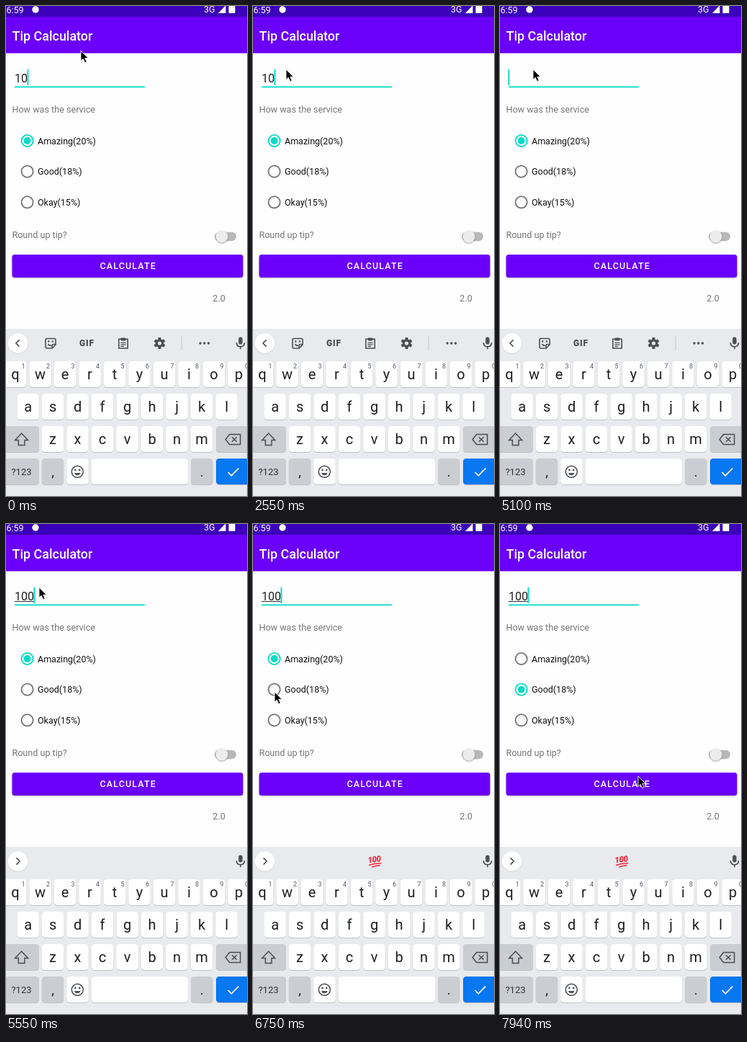
Write an HTML page with a canvas that moves like this. It is 335 px wide and 680 px high and loops after 8 s.

```html
<!DOCTYPE html>
<html lang="en">
<head>
<meta charset="utf-8">
<title>Tip Calculator</title>
<style>
html, body { margin: 0; width: 100%; height: 100%; overflow: hidden; background: #fefefe; }
canvas { display: block; width: 335px; height: 680px; }
</style>
</head>
<body>
<canvas id="stage"></canvas>
<script>
const W = 335, H = 680, LOOP = 8000;
const PURPLE = '#6a00fa', DARK = '#3b00b9', TEAL = '#00dac6', GRAY = '#757575', ICON = '#4a4d51';
const FONT = 'Roboto, sans-serif';
const canvas = document.getElementById('stage');
const ctx = canvas.getContext('2d');
const dpr = window.devicePixelRatio || 1;
canvas.width = W * dpr;
canvas.height = H * dpr;

// Held states: [start time, value...]
const POINTER = [
  [0, 104, 62], [150, 80, 84], [300, 61, 100],
  [1650, 41, 110], [1800, 40, 113], [1950, 43, 98], [2100, 46, 88],
  [5850, 64, 140], [6000, 84, 195], [6150, 75, 210], [6300, 55, 223],
  [6450, 40, 230], [6600, 32, 234], [6750, 30, 233],
  [7500, 90, 268], [7650, 165, 325], [7800, 204, 351], [7940, 192, 350]
];
const AMOUNT = [[0, '10'], [4050, '1'], [4200, ''], [5250, '1'], [5400, '10'], [5550, '100']];
const CARET = [
  [0, 1], [150, 0], [600, 1], [1050, 0], [1650, 1], [2100, 0], [2550, 1], [3150, 0],
  [3600, 1], [4650, 0], [5100, 1], [6150, 0], [6600, 1], [7050, 0], [7650, 1]
];
const STRIP = [[0, 'tools'], [5400, 'empty'], [5700, 'emoji']];
const RADIOS = [[0, 'on', 'off'], [7200, 'fill', 'fillOn'], [7350, 'off', 'on']];
const RIPPLE = [[0, 0, 0], [7050, 10, 0.08], [7200, 18, 0.12], [7350, 18, 0.05], [7500, 0, 0]];

function at(track, t) {
  let state = track[0];
  for (const s of track) if (s[0] <= t) state = s;
  return state.slice(1);
}

function text(str, x, y, size, color, opt = {}) {
  ctx.font = `${opt.style || ''} ${opt.weight || 400} ${size}px ${FONT}`;
  ctx.textAlign = opt.align || 'left';
  ctx.letterSpacing = (opt.spacing || 0) + 'px';
  ctx.fillStyle = color;
  ctx.fillText(str, x, y);
  ctx.letterSpacing = '0px';
}

function rect(x, y, w, h, color, r = 0) {
  ctx.fillStyle = color;
  ctx.beginPath();
  ctx.roundRect(x, y, w, h, r);
  ctx.fill();
}

function disc(x, y, r, color) {
  ctx.fillStyle = color;
  ctx.beginPath();
  ctx.arc(x, y, r, 0, Math.PI * 2);
  ctx.fill();
}

function ring(x, y, r, color, width) {
  ctx.strokeStyle = color;
  ctx.lineWidth = width;
  ctx.beginPath();
  ctx.arc(x, y, r, 0, Math.PI * 2);
  ctx.stroke();
}

function path(d, x, y, { fill, stroke, width = 1.5 } = {}) {
  const p = new Path2D(d);
  ctx.save();
  ctx.translate(x, y);
  if (fill) { ctx.fillStyle = fill; ctx.fill(p); }
  if (stroke) { ctx.strokeStyle = stroke; ctx.lineWidth = width; ctx.stroke(p); }
  ctx.restore();
}

function shadow(color, blur, dy) {
  ctx.shadowColor = color;
  ctx.shadowBlur = blur * dpr;
  ctx.shadowOffsetY = dy * dpr;
}

function header() {
  rect(0, 0, W, 65.5, PURPLE);
  rect(0, 0, W, 15, DARK);
  text('6:59', 0.5, 9.5, 12.5, '#fff');
  disc(41, 5, 4.7, '#fff');
  text('3G', 275, 9.2, 12.5, '#fff');
  path('M0 10 L10.5 -1 V10 Z', 295, 0, { fill: '#fff' });
  rect(309.5, -2, 9, 12, '#fff', 1);
  text('Tip Calculator', 8.6, 47.8, 17.9, '#fff', { weight: 500 });
}

function field(t) {
  const [amount] = at(AMOUNT, t);
  const width = amount.length * 9.02;
  text(amount, 12, 105.7, 16.07, '#212121');
  if (t >= 5250) rect(12, 107, width, 1, '#303030');
  if (at(CARET, t)[0]) rect(11.4 + width, 88, 1.9, 22, TEAL);
  rect(12, 111.5, 181, 1.8, TEAL);
}

function radio(y, state, label) {
  const x = 29.6, on = state === 'on' || state === 'fillOn';
  const color = on ? TEAL : '#737373';
  if (state.startsWith('fill')) disc(x, y, 8.4, color);
  else ring(x, y, 8.1, color, 1.8);
  if (state === 'on') disc(x, y, 4.9, TEAL);
  text(label, 44, y + 4.5, 12.5, '#111');
}

function form(t) {
  field(t);
  text('How was the service', 8.4, 147.5, 12.6, GRAY);
  const [radius, alpha] = at(RIPPLE, t);
  if (radius) disc(29.6, 230, radius, `rgba(0,0,0,${alpha})`);
  const [first, second] = at(RADIOS, t);
  radio(187, first, 'Amazing(20%)');
  radio(229.7, second, 'Good(18%)');
  radio(272.3, 'off', 'Okay(15%)');

  text('Round up tip?', 8.4, 321.5, 12.6, GRAY);
  rect(290, 313.7, 30, 12.5, '#b8b8b8', 6.25);
  shadow('rgba(0,0,0,.35)', 2, 0.8);
  disc(300, 320, 8.6, '#ececec');
  shadow('rgba(0,0,0,.28)', 2, 1);
  rect(8.5, 345, 321, 31.8, PURPLE, 3.5);
  shadow('transparent', 0, 0);
  text('CALCULATE', 169.7, 365.4, 12.5, '#fff', { weight: 500, align: 'center', spacing: 1.12 });
  text('2.0', 304.8, 410, 12.6, GRAY, { align: 'right' });
}

function tools() {
  const line = { stroke: ICON, width: 1.6 };
  path('M-5 -6.5 H5 Q7 -6.5 7 -4.5 V2 L2 7 H-5 Q-7 7 -7 5 V-4.5 Q-7 -6.5 -5 -6.5 Z M7 1.5 H4 Q2 1.5 2 3.5 V7', 62, 468, line);
  path('M-3.5 1 Q-2 3.8 1 3.2', 62, 468, line);
  disc(59.2, 465.5, 1.2, ICON);
  disc(64.8, 465.5, 1.2, ICON);
  text('GIF', 112.4, 472.2, 12, ICON, { weight: 900, align: 'center', spacing: 0.8 });

  path('M-6.2 -5.7 H6.2 V7 H-6.2 Z', 163, 468, line);
  rect(159.5, 460.5, 7, 4, ICON, 1);
  path('M-3.5 -0.7 H3.5 M-3.5 1.8 H3.5 M-3.5 4.3 H1', 163, 468, { stroke: ICON, width: 1.2 });

  ctx.save();
  ctx.translate(213.5, 468);
  for (let i = 0; i < 6; i++) {
    rect(-2, -8, 4, 5, ICON, 0.8);
    ctx.rotate(Math.PI / 3);
  }
  ctx.restore();
  ring(213.5, 468, 4.2, ICON, 3.2);

  rect(243.7, 458, 1, 20, '#c8cacd');
  for (let i = -1; i < 2; i++) disc(275.8 + i * 5.7, 468, 1.7, ICON);
}

function hundred() {
  const red = '#f0283c';
  ctx.save();
  ctx.translate(169, 467.5);
  ctx.rotate(-0.13);
  text('100', -0.3, 1.8, 11.5, red, { weight: 900, style: 'italic', align: 'center', spacing: -0.5 });
  path('M-8.5 5 Q0 3 8.8 4.4 M-5 8.3 Q1 6.2 6.5 7.3', 0, 0, { stroke: red, width: 1.6 });
  ctx.restore();
}

function strip(t) {
  const [mode] = at(STRIP, t);
  shadow('rgba(0,0,0,.15)', 1.5, 0.6);
  disc(16.5, 468, 13.7, '#fff');
  shadow('transparent', 0, 0);
  const chevron = mode === 'tools' ? 'M2 -4.6 L-2.6 0 L2 4.6' : 'M-2 -4.6 L2.6 0 L-2 4.6';
  path(chevron, 16.5, 468, { stroke: ICON, width: 1.6 });
  if (mode === 'tools') tools();
  if (mode === 'emoji') hundred();
  rect(323.3, 459.5, 5.4, 10, ICON, 2.7);
  path('M-5.6 -1 Q-5.6 4.8 0 4.8 Q5.6 4.8 5.6 -1 M0 4.8 V8.2', 326, 468, { stroke: ICON, width: 1.6 });
}

function key(x, y, w, color = '#fff') {
  rect(x, y + 1, w, 36, '#bfc1c5', 4.5);
  rect(x, y, w, 36, color, 4.5);
}

function letters(row, x0, y, hints) {
  [...row].forEach((ch, i) => {
    const x = x0 + i * 34.5;
    key(x - 15.2, y, 30.4);
    text(ch, x, y + 24.5, 20, '#1c1d1f', { align: 'center' });
    if (hints) text((i + 1) % 10, x + 11, y + 9.6, 9, '#55585c', { align: 'center' });
  });
}

function keyboard(t) {
  const mod = '#cacdd2';
  rect(0, 448, W, H - 448, '#e8eaed');
  strip(t);
  letters('qwertyuiop', 13, 493, true);
  letters('asdfghjkl', 30.6, 538);
  letters('zxcvbnm', 65, 583);
  key(-8, 583, 54, mod);
  path('M0 -9 L9 0.5 H4.3 V7.5 H-4.3 V0.5 H-9 Z', 21.6, 602, { stroke: ICON });
  key(292, 583, 54, mod);
  path('M-10.5 0 L-5 -7 H10 V7 H-5 Z M-1.7 -3.3 L5 3.3 M5 -3.3 L-1.7 3.3', 315.7, 601.5, { stroke: ICON });

  key(-8, 628, 54, mod);
  text('?123', 21.5, 651, 13, '#303236', { align: 'center' });
  key(49.8, 628, 30.4, mod);
  text(',', 65.2, 653, 19, '#202124', { align: 'center' });
  key(84.3, 628, 30.4);
  ring(99.3, 646.3, 8, ICON, 1.5);
  disc(96.4, 643.9, 1.3, ICON);
  disc(102.2, 643.9, 1.3, ICON);
  path('M-4.3 1.7 Q-3 5 0 5 Q3 5 4.3 1.7 Z', 99.3, 646.3, { fill: ICON });
  key(118.7, 628, 134.4);
  key(257, 628, 30.4, mod);
  text('.', 272.3, 653, 19, '#202124', { align: 'center' });
  key(292, 628, 54, '#0877f2');
  path('M-7.3 0 L-2.7 4.8 L7.3 -5.3', 316, 647, { stroke: '#fff', width: 1.8 });
}

function pointer(t) {
  const [x, y] = at(POINTER, t);
  path('M0 0 V14.3 L3.2 11.3 L5.6 16.7 L8.2 15.5 L5.8 10.3 H10.3 Z', x, y,
    { fill: '#000', stroke: '#fff', width: 0.9 });
}

function draw(now) {
  const t = now % LOOP;
  ctx.setTransform(dpr, 0, 0, dpr, 0, 0);
  rect(0, 0, W, H, '#fefefe');
  header();
  form(t);
  keyboard(t);
  pointer(t);
}

const start = performance.now();
function frame() {
  draw(performance.now() - start);
  requestAnimationFrame(frame);
}
frame();
</script>
</body>
</html>
```
